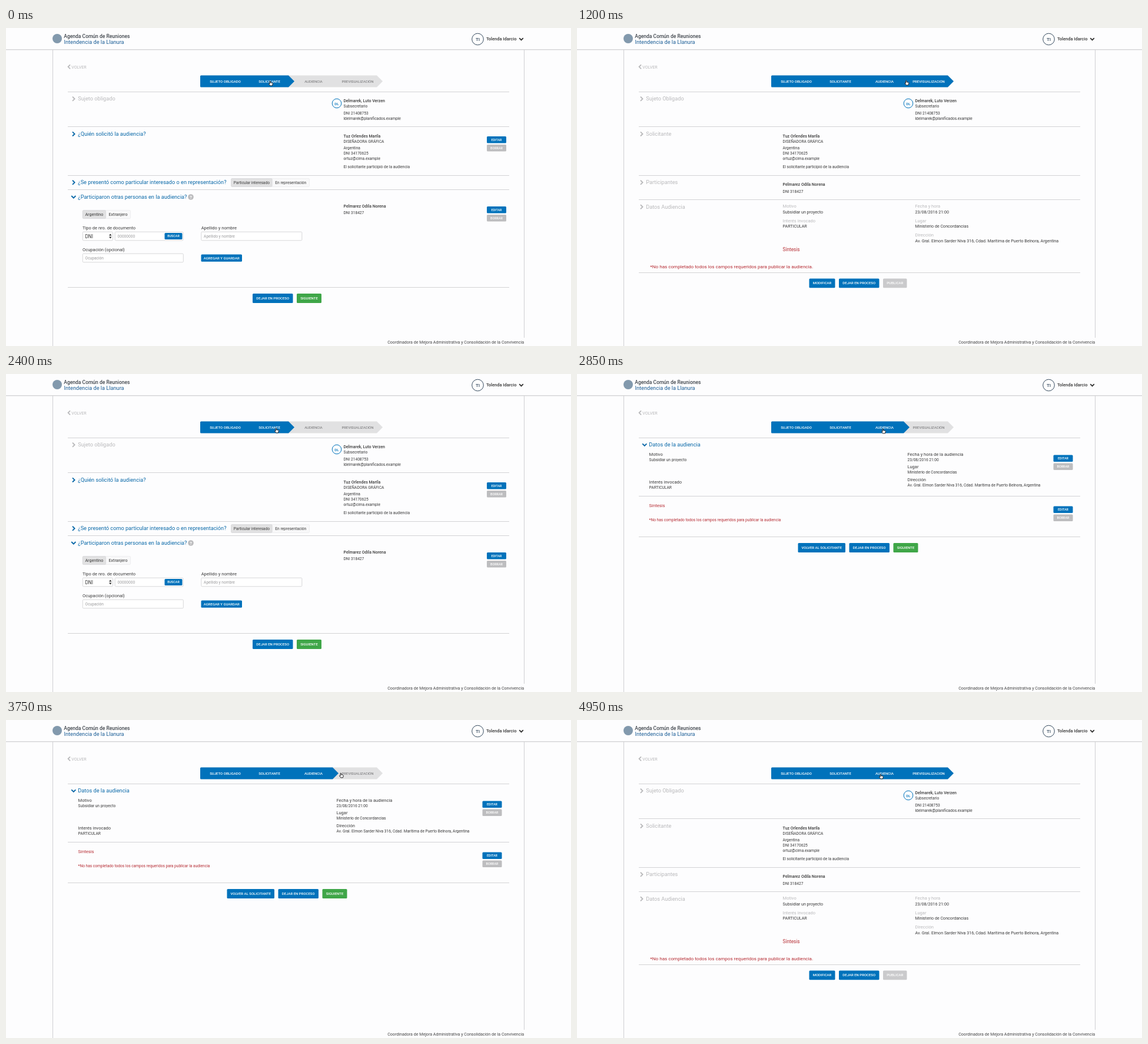
An HTML page with a canvas that plays this animation: 960 by 540 pixels, repeating every 5 s.

```html
<!DOCTYPE html>
<html lang="es">
<head>
<meta charset="utf-8">
<title>Agenda</title>
<style>
html, body { margin: 0; width: 100%; height: 100%; overflow: hidden; background: #fdfdfe; }
canvas { display: block; width: 960px; height: 540px; }
</style>
</head>
<body>
<canvas id="stage" width="960" height="540"></canvas>
<script>
const ctx = document.getElementById('stage').getContext('2d');
const LOOP = 5000, STEP = 50;
const BLUE = '#0072bb', LINK = '#0868a8', INK = '#393939', PALE = '#b9b9bb',
      RED = '#b52a31', GREEN = '#3fa648', RULE = '#d3d3d5', OFF = '#bdbdbf';

const HOST = 'Delmarek, Luto Verzen';
const APPLICANT = 'Tuz Orlendes Marila';
const GUEST = 'Pelmarez Odila Norena';
const PLACE = 'Ministerio de Concordancias';
const ADDRESS = 'Av. Gral. Elmon Sarder Niva 316, Cdad. Marítima de Puerto Belnora, Argentina';
const WARNING = '*No has completado todos los campos requeridos para publicar la audiencia';

// y is the middle of the capitals
function text(str, x, y, size = 6.62, color = INK, weight = 400, align = 'left') {
  ctx.font = `${weight} ${size}px Roboto, sans-serif`;
  ctx.fillStyle = color;
  ctx.textAlign = align;
  ctx.fillText(str, x, y + size * 0.355);
}

function box(x, y, w, h, fill, stroke, r = 1.5) {
  ctx.beginPath();
  ctx.roundRect(x, y, w, h, r);
  if (fill) { ctx.fillStyle = fill; ctx.fill(); }
  if (stroke) { ctx.strokeStyle = stroke; ctx.lineWidth = 0.8; ctx.stroke(); }
}

function button(label, x, y, w, h, color, size = 6) {
  box(x, y, w, h, color);
  text(label, x + w / 2, y + h / 2, size, '#fff', 500, 'center');
}

function editButtons(x, y) {
  button('EDITAR', x, y, 33, 11.5, BLUE, 5.4);
  button('BORRAR', x, y + 14, 33, 11.5, OFF, 5.4);
}

function line(x1, y1, x2, y2, color = RULE, width = 1) {
  ctx.strokeStyle = color;
  ctx.lineWidth = width;
  ctx.beginPath();
  ctx.moveTo(x1, y1);
  ctx.lineTo(x2, y2);
  ctx.stroke();
}

const rules = (...ys) => ys.forEach(y => line(105, y, 855, y));

function chevron(x, y, angle, color, size = 3.6, width = 1.9) {
  ctx.save();
  ctx.translate(x, y);
  ctx.rotate(angle);
  ctx.strokeStyle = color;
  ctx.lineWidth = width;
  ctx.beginPath();
  ctx.moveTo(-size / 2, -size);
  ctx.lineTo(size / 2, 0);
  ctx.lineTo(-size / 2, size);
  ctx.stroke();
  ctx.restore();
}

function badge(label, x, y, r, size, color) {
  ctx.beginPath();
  ctx.arc(x, y, r, 0, 7);
  ctx.fillStyle = '#fff';
  ctx.fill();
  ctx.strokeStyle = color;
  ctx.lineWidth = 1;
  ctx.stroke();
  text(label, x, y + 0.3, size, color, 500, 'center');
}

function dot(x, y, r, color) {
  ctx.fillStyle = color;
  ctx.beginPath();
  ctx.arc(x, y, r, 0, 7);
  ctx.fill();
}

function heading(label, x, y, color, open) {
  chevron(x - 7.5, y + 0.3, open ? Math.PI / 2 : 0, color);
  text(label, x, y, 9.18, color);
}

function arrow(x, end, color) {
  ctx.fillStyle = color;
  ctx.beginPath();
  ctx.moveTo(x + 1.5, 80.5);
  ctx.lineTo(end, 80.5);
  ctx.lineTo(end + 10, 90.5);
  ctx.lineTo(end, 100.5);
  ctx.lineTo(x + 1.5, 100.5);
  ctx.quadraticCurveTo(x, 100.5, x, 99);
  ctx.lineTo(x, 82);
  ctx.quadraticCurveTo(x, 80.5, x + 1.5, 80.5);
  ctx.fill();
}

function stepper(done) {
  arrow(330, 630, '#e1e1e2');
  arrow(330, 330 + 75 * done, BLUE);
  ['SUJETO OBLIGADO', 'SOLICITANTE', 'AUDIENCIA', 'PREVISUALIZACIÓN'].forEach((label, i) =>
    text(label, 372.5 + 75 * i, 90.8, 6, i < done ? '#fff' : '#6c6c6e', i < done ? 500 : 400, 'center'));
}

function frame() {
  ctx.fillStyle = '#fdfdfe';
  ctx.fillRect(0, 0, 960, 540);
  line(0, 36.5, 960, 36.5, '#d4d4d6');
  line(0, 37.5, 960, 37.5, '#ececee');
  line(79.5, 37, 79.5, 540, '#d0d0d2');
  line(880.5, 37, 880.5, 526, '#d0d0d2');
  dot(87, 18, 8, '#8299ad');
  text('Agenda Común de Reuniones', 98.3, 14, 8.5, '#40464d', 500);
  text('Intendencia de la Llanura', 98.5, 23.8, 9.2, '#1a5d96');
  badge('TI', 801.5, 19, 9.8, 8, '#34495e');
  text('Tolenda Idarcio', 816, 18.6, 7.5, '#333', 500);
  chevron(875.5, 18.8, Math.PI / 2, '#333', 3.3, 1.8);
  chevron(107.3, 65.8, Math.PI, PALE, 3.5, 1.8);
  text('VOLVER', 111.2, 66, 7.1, PALE);
  text('Coordinadora de Mejora Administrativa y Consolidación de la Convivencia',
    880, 533.5, 7.1, '#444', 400, 'right');
}

function host(x) {
  badge('DL', x - 11.5, 128, 7.8, 6.2, BLUE);
  text(HOST, x, 123.8, 7, INK, 500);
  text('Subsecretario', x, 132.8);
  text('DNI 21408753', x, 144.3);
  text('ldelmarek@planificados.example', x, 153.3);
}

function applicant(x) {
  text(APPLICANT, x, 183.3, 7, INK, 500);
  text('DISEÑADORA GRÁFICA', x, 192.3);
  text('Argentina', x, 203.8);
  text('DNI 34170625', x, 212.8);
  text('ortuz@cima.example', x, 221.8);
  text('El solicitante participió de la audiencia', x, 235.9);
}

function guest(x, y) {
  text(GUEST, x, y, 7, INK, 500);
  text('DNI 318427', x, y + 11.7);
}

function toggle(x, y, w1, w2, h, first, second, size) {
  box(x, y, w1 + w2, h, '#f8f8f9', '#ebebed');
  box(x, y, w1, h, '#e1e1e2', '#d9d9db');
  text(first, x + w1 / 2, y + h / 2, size, INK, 400, 'center');
  text(second, x + w1 + w2 / 2, y + h / 2, size, INK, 400, 'center');
}

function field(x, y, w, hint) {
  box(x, y, w, 14.6, '#fff', '#cfcfd1');
  text(hint, x + 4.3, y + 7.4, 6.6, '#9a9a9c');
}

function applicantPage() {
  stepper(2);
  rules(108.5, 167.5, 250.5, 274.5, 440.5);
  heading('Sujeto obligado', 122.3, 120, PALE);
  host(573.5);
  heading('¿Quién solicitó la audiencia?', 122.3, 179.6, LINK);
  applicant(573.5);
  editButtons(817, 184);
  heading('¿Se presentó como particular interesado o en representación?', 122.3, 262, LINK);
  toggle(382.6, 255.6, 69.5, 63.4, 13.8, 'Particular interesado', 'En representación', 6.62);
  heading('¿Participaron otras personas en la audiencia?', 122.3, 286.5, LINK, true);
  dot(314, 287, 4.8, '#bcbcbe');
  text('?', 314, 287.2, 7.5, '#fff', 700, 'center');
  guest(573.5, 302.1);
  editButtons(817, 303);

  toggle(130.3, 309.6, 39.2, 42, 14, 'Argentino', 'Extranjero', 7.2);
  text('Tipo de nro. de documento', 130, 339.4, 7.55);
  text('Apellido y nombre', 331.7, 339.4, 7.55);
  box(130.3, 346.2, 51.2, 14.6, '#fff', '#cfcfd1');
  text('DNI', 134.5, 353.7, 8.2);
  ctx.fillStyle = '#333';
  for (const s of [-1, 1]) {
    ctx.beginPath();
    ctx.moveTo(175, 353.5 + s * 1);
    ctx.lineTo(179.6, 353.5 + s * 1);
    ctx.lineTo(177.3, 353.5 + s * 4);
    ctx.fill();
  }
  field(185.2, 346.2, 115.8, '00000000');
  button('BUSCAR', 269.5, 348, 30, 11, BLUE, 5.4);
  field(331.8, 346.2, 171, 'Apellido y nombre');
  text('Ocupación (opcional)', 130, 376.4, 7.55);
  field(130.3, 383.2, 171, 'Ocupación');
  button('AGREGAR Y GUARDAR', 331.5, 384.5, 69.5, 12.3, BLUE);
  button('DEJAR EN PROCESO', 419, 451, 68.5, 16, BLUE);
  button('SIGUIENTE', 494, 451, 42, 16, GREEN);
}

function hearingPage() {
  stepper(3);
  rules(108.5, 207.5, 276.5);
  heading('Datos de la audiencia', 122.3, 119.9, LINK, true);
  [['Motivo', 'Subsidiar un proyecto', 122.6, 136],
   ['Interés invocado', 'PARTICULAR', 122.6, 183.5],
   ['Fecha y hora de la audiencia', '23/08/2016 21:00', 561.5, 136],
   ['Lugar', PLACE, 561.5, 157.5],
   ['Dirección', ADDRESS, 561.5, 179]
  ].forEach(([label, value, x, y]) => {
    text(label, x, y, 7.55);
    text(value, x, y + 9.3);
  });
  editButtons(809.5, 137.5);
  text('Síntesis', 122.6, 223, 7.6, RED);
  text(WARNING, 122.6, 247.2, 6.6, RED);
  editButtons(809.5, 224.5);
  button('VOLVER AL SOLICITANTE', 375.5, 287, 80.5, 16, BLUE);
  button('DEJAR EN PROCESO', 462.5, 287, 68.5, 16, BLUE);
  button('SIGUIENTE', 537.5, 287, 42, 16, GREEN);
}

function previewPage() {
  stepper(4);
  rules(108.5, 167.5, 250.5, 291.5, 415.5);
  heading('Sujeto Obligado', 117.2, 120, PALE);
  heading('Solicitante', 117.2, 179.6, PALE);
  heading('Participantes', 117.2, 262, PALE);
  heading('Datos Audiencia', 117.2, 303.5, PALE);
  host(574.5);
  applicant(349.6);
  guest(349.6, 265.6);
  [['Motivo', 'Subsidiar un proyecto', 349.6, 302.4],
   ['Interés invocado', 'PARTICULAR', 349.6, 327],
   ['Fecha y hora', '23/08/2016 21:00', 574.5, 302.4],
   ['Lugar', PLACE, 574.5, 327],
   ['Dirección', ADDRESS, 574.5, 351.5]
  ].forEach(([label, value, x, y]) => {
    text(label, x, y, 7.55, PALE);
    text(value, x, y + 9.7, 7.13);
  });
  text('Síntesis', 349.6, 376.4, 8.2, RED);
  text(WARNING + '.', 124.3, 404.9, 8.1, RED);
  button('MODIFICAR', 394.5, 425.5, 44, 15.7, BLUE);
  button('DEJAR EN PROCESO', 445, 425.5, 68.5, 15.7, BLUE);
  button('PUBLICAR', 520, 425.5, 40.5, 15.7, '#cacacc');
}

function hand(x, y) {
  ctx.save();
  ctx.translate(x, y);
  ctx.beginPath();
  ctx.moveTo(-1.9, 0.9);
  ctx.lineTo(-1.9, -3.4);
  ctx.quadraticCurveTo(-1.2, -4.6, -0.5, -3.4);
  ctx.lineTo(-0.5, -1.2);
  ctx.lineTo(2.6, -0.7);
  ctx.quadraticCurveTo(3.4, -0.4, 3.3, 0.8);
  ctx.lineTo(2.4, 3.9);
  ctx.lineTo(-1.2, 3.9);
  ctx.lineTo(-3.5, 0.9);
  ctx.quadraticCurveTo(-3.2, -0.2, -1.9, 0.9);
  ctx.closePath();
  ctx.fillStyle = '#fff';
  ctx.strokeStyle = '#1c1c1e';
  ctx.lineWidth = 0.95;
  ctx.lineJoin = 'round';
  ctx.fill();
  ctx.stroke();
  ctx.restore();
}

// time, x, y
const path = [
  [0, 450, 94], [750, 592, 93], [950, 592, 93], [1800, 441, 93], [2150, 441, 93],
  [2400, 460, 96], [2700, 521, 97], [3100, 521, 97], [3750, 570, 94],
  [3900, 587, 94], [4150, 587, 94], [4750, 517, 96], [5000, 517, 96]
];
const pages = [[0, applicantPage], [900, previewPage], [2100, applicantPage],
               [2750, hearingPage], [3900, previewPage]];

function pointer(t) {
  const i = path.findIndex(p => p[0] > t);
  const [t0, x0, y0] = path[i - 1], [t1, x1, y1] = path[i];
  const u = (t - t0) / (t1 - t0), k = u * u * (3 - 2 * u);
  return [x0 + (x1 - x0) * k, y0 + (y1 - y0) * k];
}

function draw(now) {
  const t = Math.floor((now % LOOP) / STEP) * STEP;
  frame();
  pages.filter(p => p[0] <= t).pop()[1]();
  hand(...pointer(t));
}

let start;
function tick(now) {
  start ??= now;
  draw(Math.max(0, now - start));
  requestAnimationFrame(tick);
}
draw(0);
requestAnimationFrame(tick);
</script>
</body>
</html>
```
